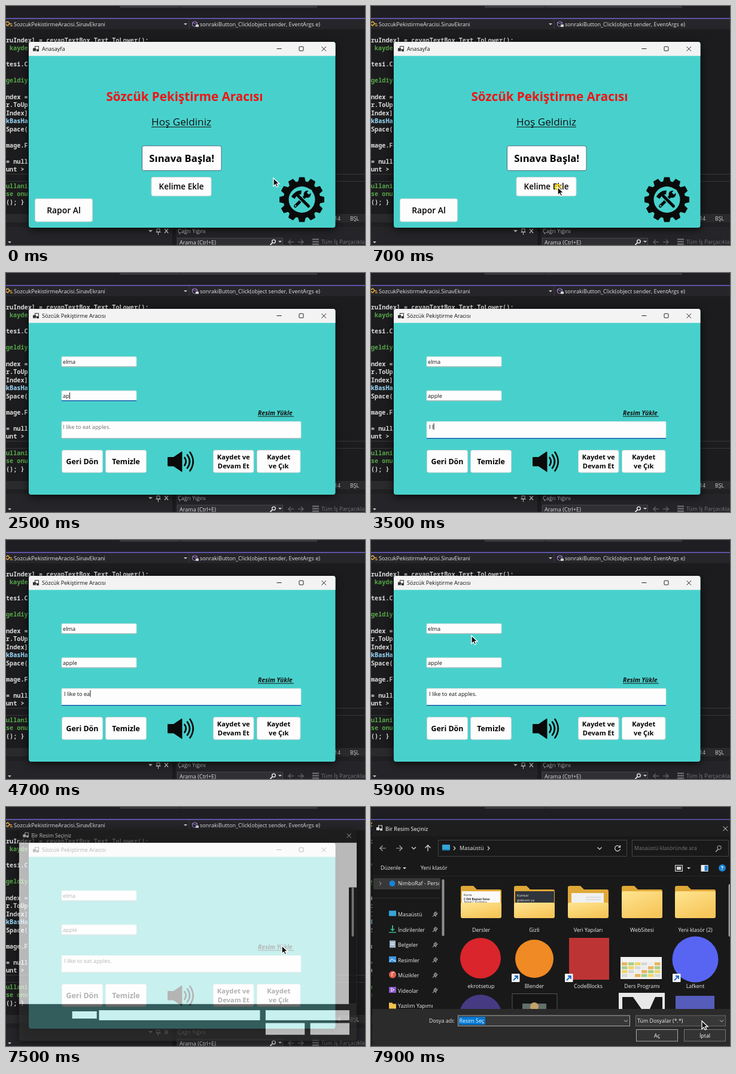
Write an HTML page that moves like this. It is 600 px wide and 400 px high and loops after 8 s.

```html
<!DOCTYPE html>
<html lang="tr">
<head>
<meta charset="utf-8">
<style>
html, body { margin: 0; width: 100%; height: 100%; overflow: hidden; background: #1c1c1e; }
svg { display: block; width: 600px; height: 400px; font-family: "Open Sans", "Noto Sans", sans-serif; }
.code { font-family: "Noto Sans Mono", "DejaVu Sans Mono", monospace; font-weight: 600; }
.frame { filter: drop-shadow(0 3px 7px #000b); }
text { white-space: pre; }
</style>
</head>
<body>
<svg id="stage" viewBox="0 0 600 400"></svg>
<script>
const APP = 'Sözcük Pekiştirme Aracısı';
const TEAL = '#48d1cc';

const rect = (x, y, w, h, fill, more = '') => `<rect x="${x}" y="${y}" width="${w}" height="${h}" fill="${fill}" ${more}/>`;
const disc = (x, y, r, fill, more = '') => `<circle cx="${x}" cy="${y}" r="${r}" fill="${fill}" ${more}/>`;
const text = (x, y, s, size, fill, more = '') => `<text x="${x}" y="${y}" font-size="${size}" fill="${fill}" ${more}>${s}</text>`;
const mid = (x, y, s, size, fill, more = '') => text(x, y, s, size, fill, 'text-anchor="middle" ' + more);
const line = (d, color, w = 1, more = '') => `<path d="${d}" fill="none" stroke="${color}" stroke-width="${w}" ${more}/>`;
const shape = (d, fill, more = '') => `<path d="${d}" fill="${fill}" ${more}/>`;
const group = (id, body) => `<g id="${id}">${body}</g>`;
const formIcon = (x, y, c) => rect(x + 3.5, y, 6, 5.5, 'none', `stroke="${c}"`) + rect(x, y + 3, 5, 5, c) + rect(x + 6, y + 5, 4, 3.5, c);

function editor() {
  const white = '#dcdcdc', green = '#57a64a', cyan = '#9cdcfe';
  const rows = [
    [0, 'ruIndex] = cevapTextBox.Text.ToLower();', 61], [6, 'kayde', 73.5, green], [0, 'tesi.C', 100.5],
    [0, 'geldiy', 128, green], [0, 'ndex =', 155.5], [0, 'r.ToUp', 169], [0, 'Index]', 182.5],
    [0, 'kBasHa', 196, cyan], [0, 'Space(', 209.5], [0, 'mage.F', 236.5], [0, '= null', 264], [0, 'unt &gt;', 277],
    [0, 'ullani', 305, green], [0, 'se onu', 318, green], [0, '(); }', 331.5]
  ];
  return rect(0, 0, 600, 400, '#1c1c1e') + rect(0, 0, 600, 20, '#1f1f23') + rect(190, 0, 330, 3, '#38383c') +
    rect(291, 0, 1, 3, '#1f1f23') + rect(0, 20, 600, 1.8, '#6c5fc4') + rect(0, 21.8, 600, 17, '#26262a') +
    rect(305.5, 22, 1, 16, '#3d3d42') +
    line('M0 28l3-2 3 3-3 4-3-2M6 30h4M7 33h4', '#d9a441', 1.6) + text(13, 34, 'SozcukPekistirmeAracisi.SinavEkrani', 9.1, '#e4e4e4') +
    shape('M297 29h6l-3 3z', '#c8c8c8') + line('M311.500 27.500l4-2 4 2v5l-4 2-4-2zl4 2 4-2', '#a884d8') + rect(317, 31, 5, 4, '#d0d0d0') +
    text(324, 34, 'sonrakiButton_Click(object sender, EventArgs e)', 9.1, '#e4e4e4') +
    rows.map(([x, s, y, c = white]) => text(x, y, s, 10.2, c, 'class="code"')).join('') +
    rect(0, 281, 600, 1, '#38383c') + rect(0, 293, 600, 1, '#38383c') +
    rect(0, 348, 600, 14, '#2a2a2d') + text(549, 358.5, '14', 8.8, '#d5d5d5') + text(575, 358.5, 'BŞL', 8.8, '#d5d5d5') +
    rect(0, 362, 600, 8, '#202023') + rect(0, 370, 600, 30, '#252529') + rect(278, 370, 6, 30, '#1b1b1d') +
    shape('M238 375h7l-3.500 3.500z', '#ddd') + line('M252 373v5h5v-5zM250.500 378.500h8M254.500 379v4', '#ddd') +
    line('M265 373l6 7M271 373l-6 7', '#ddd', 1.2) + text(287, 380, 'Çağrı Yığını', 9.1, '#ccc') +
    rect(286.5, 388.5, 176, 14, '#303034', 'stroke="#48484c"') + text(290, 399, 'Arama (Ctrl+E)', 9.1, '#ddd') +
    disc(447.5, 394, 2.8, 'none', 'stroke="#ddd" stroke-width="1.5"') + line('M445.500 396l-4 4', '#ddd', 1.8) +
    shape('M455 393h6l-3 3z', '#ccc') + shape('M3 394h6l-3 3z', '#ccc') +
    line('M481 395h-9l4-4m-4 4l4 4M488 395h9l-4-4m4 4l-4 4', '#606064', 1.3) +
    line('M512 390.500h11M512 394.500h11M512 398.500h11', '#77777b', 2) + text(527, 398, 'Tüm İş Parçacıkları', 9.1, '#77777b');
}

function frame(title) {
  return rect(38, 60, 512.5, 311, TEAL, 'rx="4" class="frame"') +
    shape('M38 83.500V64a4 4 0 0 1 4-4h504.500a4 4 0 0 1 4 4v19.500z', '#f3f3f3') + formIcon(45, 67.5, '#333') +
    text(60, 75.3, title, 9.1, '#111') + line('M452.500 71.500h8M527.500 68l7.500 7.500M535 68l-7.500 7.500', '#222') +
    rect(490, 68, 7, 7, 'none', 'rx="1" stroke="#222"');
}

function button(x, y, w, h, size, weight, rows, border = '#c9d4d4') {
  const step = 15.5, first = y + h / 2 + size * .37 - (rows.length - 1) * step / 2;
  return rect(x, y, w, h, '#fdfdfd', `rx="3" stroke="${border}"`) +
    rows.map((s, i) => mid(x + w / 2, first + i * step, s, size, '#000', `font-weight="${weight}"`)).join('');
}

function gear() {
  const ink = '#0a0a0a';
  let teeth = '';
  for (let a = 0; a < 360; a += 30) teeth += shape('M-6.500-29L-4.500-37.500H4.500L6.500-29z', ink, `transform="rotate(${a})"`);
  const wrench = line('M-7-7L11 11', ink, 5, 'stroke-linecap="round"') + disc(-9, -9, 6, ink) +
    line('M-10-10l-6-6', TEAL, 5) + disc(10.5, 10.5, 1.3, TEAL);
  const hammer = line('M6-6L-12 12', TEAL, 8) + line('M6-6L-11 11', ink, 5, 'stroke-linecap="round"') +
    line('M1-12Q9-13 15-3', ink, 6.5);
  return `<g transform="translate(494.5 324)">${teeth}${disc(0, 0, 31, ink)}${disc(0, 0, 22, TEAL)}` +
    `<g transform="scale(-1 1)">${wrench}${hammer}</g></g>`;
}

const home = () => frame('Anasayfa') +
  mid(298.5, 159, APP, 20.6, '#f01414', 'font-weight="700"') +
  mid(293, 200, 'Hoş Geldiniz', 17.2, '#111') + rect(243, 202, 100, 1, '#111') +
  button(227.5, 234, 132.5, 41.5, 16.7, 700, ['Sınava Başla!'], '#4a6a80') +
  button(243, 286.5, 100, 31.5, 13.5, 600, ['Kelime Ekle']) +
  button(48.5, 322.5, 96, 38.5, 13.9, 600, ['Rapor Al']) + gear();

const KEY = 125; // ms per typed character
const fields = [
  { x: 95, y: 152, box: [93, 140, 125, 17], value: 'elma', focus: 1300, start: 1500, end: 2200 },
  { x: 95, y: 209, box: [93, 197, 125, 17], value: 'apple', focus: 2200, start: 2350, end: 3050 },
  { x: 97, y: 260.5, box: [93, 248.5, 400, 28.5], value: 'I like to eat apples.', focus: 3050, start: 3250, end: 7400 }
];

const entry = () => frame(APP) +
  fields.map(({ box: [x, y, w, h] }, i) => rect(x, y, w, h, '#fdfdfd', 'rx="1.5" stroke="#cfdcdc" stroke-width=".8"') +
    `<rect id="under${i}" x="${x}" width="${w}"/><text id="value${i}" font-size="9.2"></text>`).join('') +
  rect(0, 0, .9, 11, '#000', 'id="caret"') +
  text(421, 238, 'Resim Yükle', 10.2, '#111', 'font-weight="700" font-style="italic"') + rect(421, 239.5, 60, 1, '#111') +
  button(93.5, 296.5, 68, 37.5, 12.4, 700, ['Geri Dön']) + button(166.5, 296.5, 68, 37.5, 12.3, 700, ['Temizle']) +
  button(346.5, 296.5, 67.5, 37.5, 11.2, 700, ['Kaydet ve', 'Devam Et']) +
  button(419.5, 296.5, 72.5, 37.5, 11.2, 700, ['Kaydet', 've Çık']) +
  shape('M270.500 308.500h9.500L294 299v33.500L280 323h-9.500z', '#0a0a0a', 'stroke="#0a0a0a" stroke-linejoin="round"') +
  line('M298.500 309q4.500 6.500 0 13M303 304.500q8 11 0 22M307.500 300q10.500 15.500 0 31', '#0a0a0a', 2.7, 'stroke-linecap="round"');

function folder(x, name, inner = '') {
  return shape(`M${x - 34} 135q0-3 3-3h18l6 6h38q3 0 3 3v42h-68z`, '#dfa837') + inner +
    rect(x - 34, inner ? 160 : 141, 68, inner ? 26 : 45, 'url(#paper)', 'rx="3"') + mid(x, 208.5, name, 8.9, '#eee');
}

function files() {
  const label = (x, s) => mid(x, 303, s, 8.9, '#eee');
  const badge = x => rect(x, 279, 13.5, 14, '#f4f4f4', 'rx="1"') + line(`M${x + 3} 290l7-7m-5 0h5v5`, '#1769c2', 1.8);
  let sheet = rect(417, 251, 69, 37, '#f2f2f2');
  for (let i = 0; i < 24; i++)
    sheet += rect(419 + i % 6 * 11, 260 + (i / 6 | 0) * 6.5, 9.5, 5, ['#e9b45f', '#d8d8d8', '#a9cf87', '#ececec', '#f0d66a'][i * 7 % 5]);
  return `<linearGradient id="paper" x1="0" y1="0" x2=".6" y2="1"><stop stop-color="#ffe591"/><stop offset="1" stop-color="#f6c65a"/></linearGradient>` +
    folder(184, 'Dersler', rect(152, 141, 64, 30, '#fafafa') + text(155, 149, 'Kurza', 5, '#222') +
      text(155, 156, 'C Dili Baştan Sona', 4.8, '#222', 'font-weight="700"') + text(155, 161, 'Temel C Kodlama', 4.8, '#222')) +
    folder(273, 'Gizli', rect(241, 141, 65, 30, '#30343b') + text(244, 150, 'Kumsal', 5.5, '#eee') + text(244, 158, 'gidecem ya', 5.5, '#eee')) +
    folder(363, 'Veri Yapıları', rect(335, 144, 54, 27, '#f0f0f0') + line('M359 151h25M359 155h25', '#ccc')) +
    folder(453, 'WebSitesi') + folder(542, 'Yeni klasör (2)') +
    disc(183, 253, 34, '#d9252b') + label(184, 'ekrotsetup') +
    disc(273, 254, 32, '#f08a24') + badge(235) + label(273, 'Blender') +
    rect(331, 219, 67, 70, '#bd3434') + badge(324) + label(363, 'CodeBlocks') + sheet + label(453, 'Ders Programı') +
    disc(542, 255, 38.5, '#5865f2') + badge(504) + label(542, 'Lafkent') +
    disc(183, 350, 36, '#463a83') + rect(236, 312.5, 75, 40, '#151515', 'stroke="#555"') +
    rect(253, 329, 40, 20, '#62706a') + disc(273, 334, 7, '#c2a36c') +
    rect(414, 311, 77, 40, '#e8e8e8') + shape('M420 338V318h18l14 20zM466 338l9-20h12v20z', '#181818') +
    rect(509, 316, 65, 40, '#565cba');
}

function sidebar() {
  const rows = [['Masaüstü', '#35a5d8'], ['İndirilenler', '#3db08a'], ['Belgeler', '#9fb5c8'], ['Resimler', '#3c96e0'],
    ['Müzikler', '#e0604c'], ['Videolar', '#8b59cc'], ['Yazılım Yapımı', '#f2c14e']];
  const icons = ['M30 -7h12v9h-12z', 'M35-8h2v6h3l-4 4-4-4h3zM30 3h12v1.500h-12z', 'M31-8h10v12h-10z', 'M30-7h12v10h-12z',
    'M36-8a6 6 0 1 0 .1 0z', 'M30-7h12v10h-12z', 'M30-6h5l2 2h5v8h-12z'];
  const marks = { 2: 'M33-4h6M33-1h6', 3: 'M31 2l4-5 3 3 1-1 3 3', 4: 'M35 1v-6l4-1', 5: 'M34-5l5 3-5 3z' };
  return rect(4, 119, 112, 19, '#383838', 'rx="2"') + line('M14 125l3 3-3 3', '#aaa') + disc(35.5, 128, 5, '#1683d8') +
    `<svg x="0" y="115" width="114" height="25">${text(45, 16.3, 'NimboRaf - Personal', 8.9, '#eee')}</svg>` +
    rect(118.5, 121, 4, 95, '#8f8f8f', 'rx="2"') + rect(4, 152, 112, 1, '#303030') +
    rows.map(([s, c], i) => `<g transform="translate(0 ${180.5 + i * 25.5})">${shape(icons[i], c)}${marks[i] ? line(marks[i], '#fff') : ''}` +
      text(45, 2.5, s, 8.9, '#eee') + (i < 6 ? line('M106-4l4 4M105-1l4 4M108-5l3 3-3 3-3-3zM106 0l-3 3', '#999', 1.1) : '') + '</g>').join('');
}

function picker() {
  const input = '#383838';
  const loading = rect(2, 49, 604, 289, '#fff') + rect(592, 129, 14, 209, '#191919') + rect(597, 129, 4, 88, '#9a9a9a', 'rx="2"') +
    rect(97, 351, 44, 13, '#fff') + rect(145, 349, 288, 18, '#fff') + rect(443, 349, 150, 18, '#fff') +
    rect(443, 372, 70, 21, '#fff') + rect(523, 372, 70, 21, '#fff');
  const loaded = rect(2, 49, 604, 289, '#191919') +
    line('M25 69h-10l4.500-4.500m-4.500 4.500l4.500 4.500M42 69h10l-4.500-4.500m4.500 4.500l-4.500 4.500', '#aaa', 1.2) +
    line('M68 67l3.500 3.500 3.500-3.500M95 74v-10l-4.500 4.500m4.500-4.500l4.500 4.500', '#ddd', 1.2) +
    rect(112.5, 55.5, 315, 27, '#191919', 'stroke="#444"') + rect(119, 63, 13, 10, '#35a5d8') + rect(119, 71, 13, 2, '#1772a5') +
    line('M138 66l3 3-3 3M195 66l3 3-3 3M378.500 67.500l3.500 3.500 3.500-3.500', '#ddd', 1.1) + text(148, 72.3, 'Masaüstü', 8.9, '#eee') +
    line('M416 67a4.500 4.500 0 1 0 .5 3M416.500 64v3.500h-3.500', '#ddd', 1.2) +
    rect(436.5, 55.5, 161, 27, '#191919', 'stroke="#444"') + text(440, 72.3, 'Masaüstü klasöründe ara', 8.9, '#777') +
    disc(582, 68, 3.2, 'none', 'stroke="#bbb"') + line('M580 71l-4 4', '#bbb', 1.2) +
    text(16, 105.3, 'Düzenle', 8.9, '#eee') + shape('M53 101h6l-3 3z', '#ddd') + text(83, 105.3, 'Yeni klasör', 8.9, '#eee') +
    rect(508.5, 97.5, 12, 10, '#333', 'stroke="#ddd"') + rect(511, 100, 7, 5, '#ddd') + shape('M528 101h6l-3 3z', '#ddd') +
    rect(551.5, 97, 12, 11, '#eee') + rect(557.5, 98, 5, 9, '#2382d0') + disc(587, 102, 6, '#1b82d2') + mid(587, 105.3, '?', 9, '#fff', 'font-weight="700"') +
    rect(2, 115, 604, 1, '#262626') + `<svg width="600" height="338">${sidebar()}${files()}</svg>` +
    rect(597.5, 129, 4, 88, '#9a9a9a', 'rx="2"') +
    text(97, 361, 'Dosya adı:', 8.9, '#eee') + rect(145.5, 349, 287, 17.5, input, 'stroke="#aaa"') + rect(147, 351, 44, 13.5, '#0078d4') +
    text(147.5, 361, 'Resim Seç', 8.9, '#fff') + rect(442.5, 349, 150, 17.5, input, 'stroke="#666"') + text(445, 361, 'Tüm Dosyalar (*.*)', 8.9, '#eee') +
    line('M423 356.500l3 3 3-3M583 356.500l3 3 3-3', '#ccc') +
    rect(443.5, 372.5, 69, 19.5, '#333', 'stroke="#aaa"') + mid(478, 385.5, 'Aç', 8.9, '#fff') +
    rect(523.5, 372.5, 69, 19.5, '#333', 'stroke="#777"') + mid(558, 385.5, 'İptal', 8.9, '#fff');
  return rect(2, 24, 604, 380, '#2b2b2b', 'rx="5" class="frame"') + rect(2, 24, 604, 25, '#1e1e1e', 'rx="4"') + formIcon(9, 31, '#ddd') +
    text(24, 40, 'Bir Resim Seçiniz', 9.1, '#fff') + line('M588.500 32.500l7.500 7.500M596 32.500l-7.500 7.500', '#ddd') +
    group('loading', loading) + group('loaded', loaded);
}

const stage = document.getElementById('stage');
stage.innerHTML = editor() + group('home', home()) + group('entry', entry()) + group('picker', picker()) +
  disc(0, 0, 4.5, '#ffe60080', 'id="click" stroke="#f2c800" stroke-width="2"') +
  shape('M0 0V13.500L3.200 10.700L5.300 15L7.700 13.900L5.700 9.700H10z', '#111', 'id="mouse" stroke="#fff" stroke-width="1.3"');

const $ = id => document.getElementById(id);
const set = (el, attrs) => { for (const k in attrs) el.setAttribute(k, attrs[k]); };
const show = (id, on) => { $(id).style.display = on ? '' : 'none'; };
const clamp = v => Math.max(0, Math.min(1, v));
const route = [[0, 447, 288], [500, 312, 303], [900, 312, 303], [1200, 168, 160], [5900, 168, 160],
  [6700, 460, 232], [7500, 461, 232], [7900, 553, 358], [8000, 553, 358]];

function mouseAt(t) {
  const i = route.findIndex(p => p[0] > t), [t0, x0, y0] = route[i - 1], [t1, x1, y1] = route[i];
  const p = (t - t0) / (t1 - t0), e = p * p * (3 - 2 * p);
  return [x0 + (x1 - x0) * e, y0 + (y1 - y0) * e];
}

// Scale and fade a window around its centre; e runs from 0 to 1.
function pose(id, e, cx, cy, shrink) {
  const s = 1 - shrink * (1 - e);
  show(id, e > 0);
  set($(id), { opacity: e, transform: `translate(${cx} ${cy}) scale(${s}) translate(${-cx} ${-cy})` });
}

function typeFields(t) {
  show('caret', false);
  fields.forEach((f, i) => {
    const waiting = t < f.focus, focused = !waiting && t < f.end;
    const count = Math.floor((t - f.start) / KEY) + 1;
    const el = $('value' + i), [, y, , h] = f.box;
    el.textContent = waiting ? f.value : f.value.slice(0, Math.max(0, count));
    set(el, { x: waiting ? 95 : f.x, y: f.y, fill: waiting ? '#707070' : '#111' });
    set($('under' + i), { y: y + h - (focused ? 1 : .6), height: focused ? 1.5 : .8, fill: focused ? '#0b5cad' : '#7f9896' });
    if (!focused) return;
    const typing = count > 0 && count <= f.value.length;
    show('caret', typing || t % 1000 < 500);
    set($('caret'), { x: f.x + el.getComputedTextLength() + .3, y: f.y - 9 });
  });
}

function draw(now) {
  const t = Math.floor(now % 8000 / 100) * 100;
  const swap = 1 - (1 - clamp((t - 800) / 200)) ** 1.7;
  pose('home', 1 - swap, 294, 215, .08);
  pose('entry', swap, 294, 215, .08);
  typeFields(t);
  pose('picker', 1 - (1 - clamp((t - 7400) / 200)) ** 1.7, 304, 214, .214);
  show('loading', t < 7700);
  show('loaded', t >= 7700);
  const [x, y] = mouseAt(t);
  show('mouse', t < fields[0].start || t >= 5900);
  set($('mouse'), { transform: `translate(${x} ${y})` });
  show('click', [700, 1200, 7200].includes(t));
  set($('click'), { cx: x, cy: y });
  requestAnimationFrame(tick);
}

let begin;
function tick(now) {
  begin ??= now;
  draw(now - begin);
}
requestAnimationFrame(tick);
</script>
</body>
</html>
```
